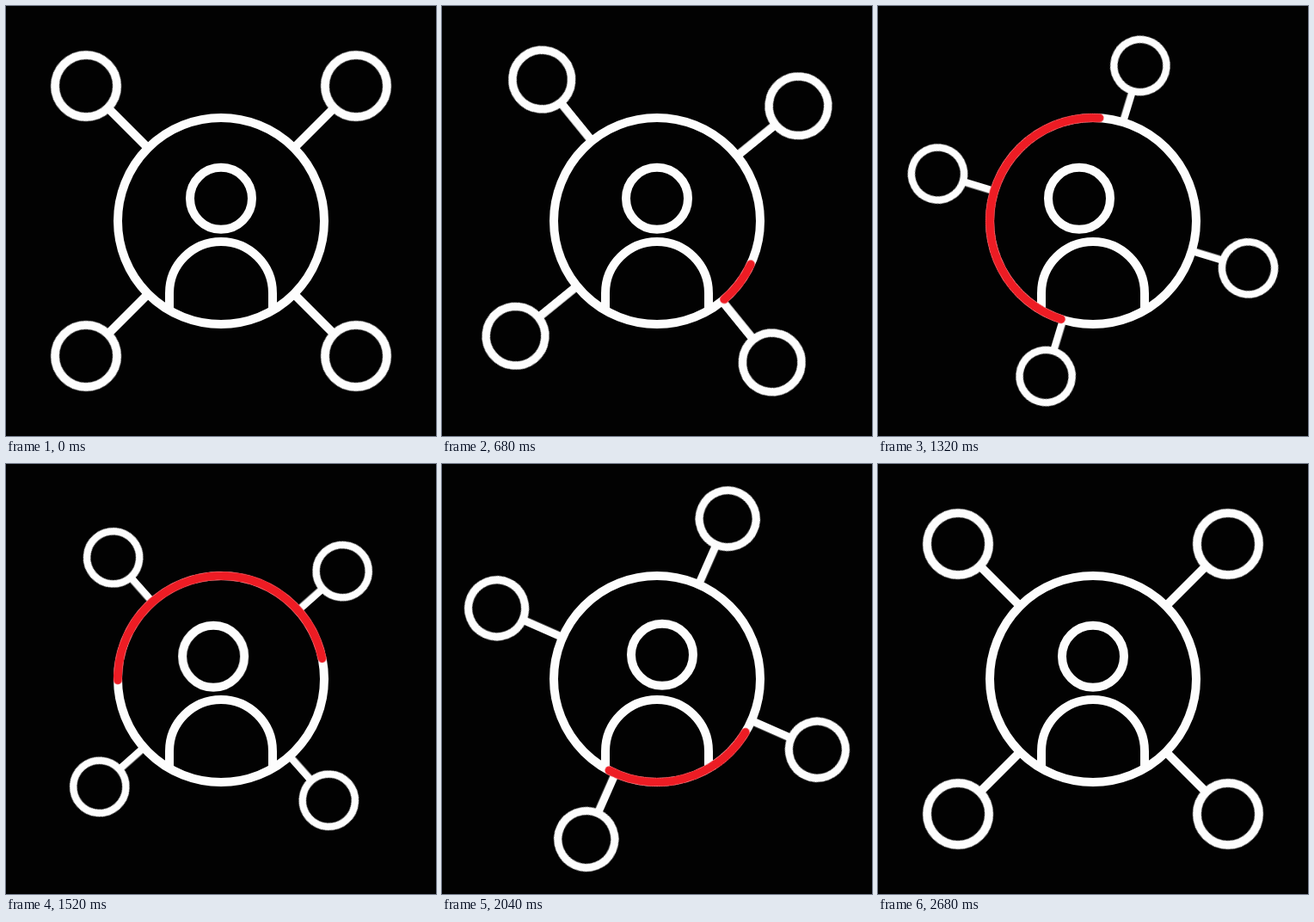
Write an HTML page without scripts that moves like this. It is 500 by 500 pixels and loops after 2920 ms.

```html
<!DOCTYPE html>
<html lang="en">
<head>
<meta charset="utf-8">
<title>Network hub</title>
<style>
  @property --tail { syntax: "<number>"; inherits: false; initial-value: 19; }
  @property --tip { syntax: "<number>"; inherits: false; initial-value: 19; }

  :root { --loop: 2920ms; --swing: cubic-bezier(.53, 0, .47, 1); }
  html, body { margin: 0; width: 100%; height: 100%; overflow: hidden; background: #020202; }
  svg { display: block; width: 100vw; height: 100vh; }

  .line { fill: none; stroke: #fdfdfd; stroke-width: 10; }
  .hub { fill: #020202; }

  .spin { animation: spin var(--loop) var(--swing) infinite; }
  .shrink { animation: shrink var(--loop) var(--swing) infinite; }
  .head { animation: sway var(--loop) var(--swing) infinite; }
  .arc {
    fill: none;
    stroke: #ed1c24;
    stroke-width: 10;
    stroke-linecap: round;
    stroke-dasharray: calc((var(--tip) - var(--tail)) * 1px) 720px;
    stroke-dashoffset: calc(var(--tail) * -1px);
    animation: tail var(--loop) infinite, tip var(--loop) infinite, show var(--loop) step-end infinite;
  }

  @keyframes spin {
    0%, 10.959% { transform: rotate(0deg); }
    91.781%, 100% { transform: rotate(180deg); }
  }
  @keyframes shrink {
    0%, 10.959% { transform: scale(1); }
    41.781%, 50% { transform: scale(.85); }
    91.781%, 100% { transform: scale(1); }
  }
  @keyframes sway {
    0%, 25.342% { transform: translate(0, 0); }
    45.205% { transform: translate(-16px, 0); }
    63.014% { transform: translate(10px, 0); animation-timing-function: ease-in; }
    69.863% { transform: translate(6px, -2px); animation-timing-function: ease-out; }
    78.767%, 100% { transform: translate(0, 0); }
  }

  /* Both arc ends are angles measured inside the spinning group. */
  @keyframes tail {
    0%, 23.288% { --tail: 19; animation-timing-function: cubic-bezier(.333, 0, .667, -.23); }
    34.247% { --tail: 21.4; animation-timing-function: cubic-bezier(.333, .13, .667, .35); }
    45.205% { --tail: 46; animation-timing-function: cubic-bezier(.333, .217, .667, .601); }
    58.904% { --tail: 138; animation-timing-function: cubic-bezier(.333, .312, .667, .677); }
    69.863% { --tail: 232; animation-timing-function: cubic-bezier(.333, .407, .667, .857); }
    84.247%, 100% { --tail: 330; }
  }
  @keyframes tip {
    0%, 16.438% { --tip: 19; animation-timing-function: cubic-bezier(.333, 0, .667, .353); }
    23.288% { --tip: 43.2; animation-timing-function: cubic-bezier(.333, .291, .667, .663); }
    34.247% { --tip: 129.3; animation-timing-function: cubic-bezier(.333, .353, .667, .701); }
    45.205% { --tip: 211.4; animation-timing-function: cubic-bezier(.333, .394, .667, .76); }
    58.904% { --tip: 289.3; animation-timing-function: cubic-bezier(.333, .508, .667, .819); }
    69.863% { --tip: 318.7; animation-timing-function: cubic-bezier(.333, .62, .667, 1); }
    84.247%, 100% { --tip: 330; }
  }
  @keyframes show {
    0% { visibility: hidden; }
    16.5% { visibility: visible; }
    84.2%, 100% { visibility: hidden; }
  }
</style>
</head>
<body>
<svg viewBox="-250 -250 500 500">
  <defs>
    <g id="node" class="line">
      <path d="M110 0H186"/>
      <circle cx="222" r="36"/>
    </g>
  </defs>

  <g class="spin">
    <g class="shrink">
      <use href="#node" transform="rotate(45)"/>
      <use href="#node" transform="rotate(135)"/>
      <use href="#node" transform="rotate(225)"/>
      <use href="#node" transform="rotate(315)"/>
    </g>
  </g>

  <circle class="line hub" r="120"/>
  <path class="line" d="M-60 102V84a60 60 0 0 1 120 0V102"/>
  <circle class="line head" cy="-26.2" r="36"/>

  <g class="spin">
    <circle class="arc" r="120" pathLength="360"/>
  </g>
</svg>
</body>
</html>
```
